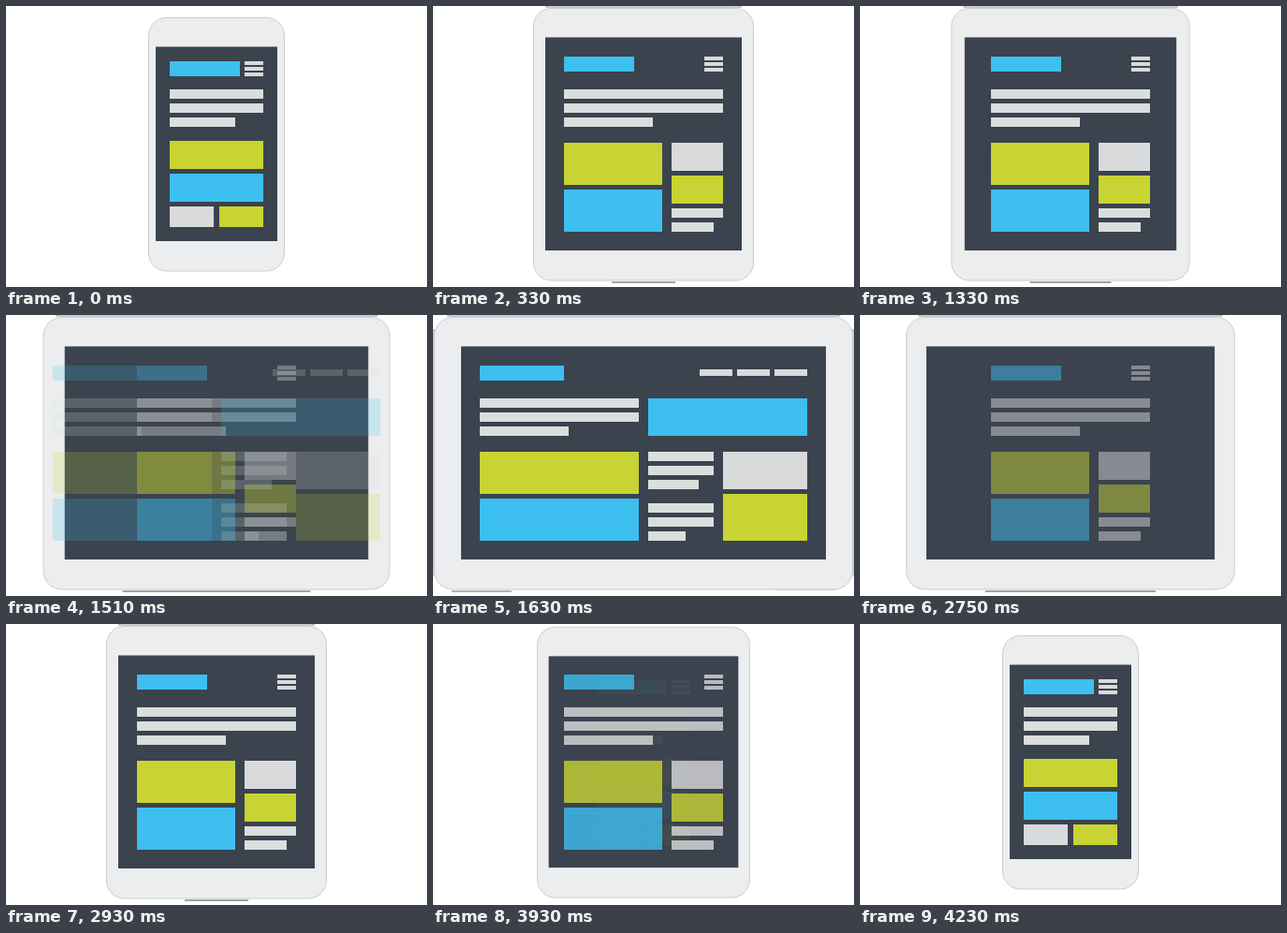
Write an HTML page with a canvas that moves like this. It is 450 px wide and 300 px high and loops after 5230 ms.

```html
<!DOCTYPE html>
<html lang="en">
<head>
<meta charset="utf-8">
<title>Responsive layout</title>
<style>
  html, body { margin: 0; width: 100%; height: 100%; overflow: hidden; background: #fff; }
  canvas { display: block; width: 450px; height: 300px; }
</style>
</head>
<body>
<canvas id="stage" width="450" height="300"></canvas>
<script>
const ctx = document.getElementById('stage').getContext('2d');
const LOOP = 5230, STEP = 30;
const BLUE = '#3dbff0', LIME = '#c8d433', GREY = '#d9dadc', BAR = '#dadedd';
const clamp = v => Math.max(0, Math.min(1, v));
const mix = (a, b, p) => a + (b - a) * p;

function box(color, x, y, w, h) {
  ctx.fillStyle = color;
  ctx.fillRect(x, y, w, h);
}
function text(x, y, ...widths) {
  widths.forEach((w, i) => box(BAR, x, y + i * 15, w, 10));
}
function menu(x, y) {
  for (let i = 0; i < 3; i++) box(GREY, x, y + i * 6, 20, 4);
}

// Edges are left, top, right, bottom.
const phone = {
  body: [152.5, 12.5, 297.5, 283], screen: [160, 43.5, 290, 251], radius: 19,
  draw() {
    box(BLUE, 175, 59, 75, 16);
    menu(255, 59);
    text(175, 89, 100, 100, 70);
    box(LIME, 175, 144, 100, 30);
    box(BLUE, 175, 179, 100, 30);
    box(GREY, 175, 214, 47, 22);
    box(LIME, 228, 214, 47, 22);
  }
};
const tablet = {
  body: [107.5, 2.5, 342.5, 293], screen: [120, 33.5, 330, 261], radius: 19,
  draw() {
    box(BLUE, 140, 54, 75, 16);
    menu(290, 54);
    text(140, 89, 170, 170, 95);
    box(LIME, 140, 146, 105, 45);
    box(BLUE, 140, 196, 105, 45);
    box(GREY, 255, 146, 55, 30);
    box(LIME, 255, 181, 55, 30);
    text(255, 216, 55, 45);
  }
};
const desktop = {
  body: [1.5, 2.5, 448.5, 293], screen: [30, 33.5, 420, 261], radius: 20,
  draw() {
    box(BLUE, 50, 54, 90, 16);
    for (let i = 0; i < 3; i++) box(GREY, 285 + i * 40, 58, 35, 7);
    text(50, 89, 170, 170, 95);
    box(BLUE, 230, 89, 170, 40);
    box(LIME, 50, 146, 170, 45);
    box(BLUE, 50, 196, 170, 45);
    text(230, 146, 70, 70, 54);
    text(230, 201, 70, 70, 40);
    box(GREY, 310, 146, 90, 40);
    box(LIME, 310, 191, 90, 50);
  }
};

function drawEdges(p) {
  const left = mix(120, 15, p), width = 450 - 2 * left;
  box('#cbc9cb', left, 0, width, 2);
  box('#dba9b3', left, 0, 4, 1);
  box('#dba9b3', left + width - 4, 0, 4, 1);
  if (p < 1) {
    const half = mix(34, 138.5, p);
    box('#a3a4a5', 225 - half, 294, 2 * half, 2);
  } else {
    box('#b2b3b4', 20, 294, 64, 2);
    box('#cfd0d1', 368, 293, 62, 1);
    box('#c9cacc', 0, 15, 2, 263);
    box('#c9cacc', 448, 15, 2, 263);
  }
}

function drawLayout(layout, alpha) {
  if (alpha <= 0) return;
  ctx.globalAlpha = alpha;
  layout.draw();
  ctx.globalAlpha = 1;
}

// p runs from 0 (small device) to 1 (large device).
function drawDevice(small, large, p) {
  box('#fff', 0, 0, 450, 300);
  if (large === desktop) drawEdges(p);
  else if (p === 1) drawEdges(0);

  const between = key => small[key].map((v, i) => mix(v, large[key][i], p));
  const [l, t, r, b] = between('body');
  ctx.beginPath();
  ctx.roundRect(l, t, r - l, b - t, mix(small.radius, large.radius, p));
  ctx.fillStyle = '#ebedee';
  ctx.fill();
  ctx.strokeStyle = '#cbcdce';
  ctx.stroke();

  const [sl, st, sr, sb] = between('screen');
  box('#3b434e', sl, st, sr - sl, sb - st);

  drawLayout(small, clamp((10.5 - 11 * p) / 9.5));
  drawLayout(large, clamp((11 * p - 6) / 5));
}

function progress(time, start, steps) {
  return clamp((Math.floor((time - start) / STEP) + 1) / steps);
}

function render(now) {
  const t = now % LOOP;
  const grow = progress(t, 60, 10), widen = progress(t, 1330, 11);
  const narrow = progress(t, 2630, 11), shrink = progress(t, 3930, 11);
  if (t >= 1330 && t < 2930) drawDevice(tablet, desktop, widen - narrow);
  else drawDevice(phone, tablet, grow - shrink);
}

const begin = performance.now();
function tick() {
  render(performance.now() - begin);
  requestAnimationFrame(tick);
}
tick();
</script>
</body>
</html>
```
